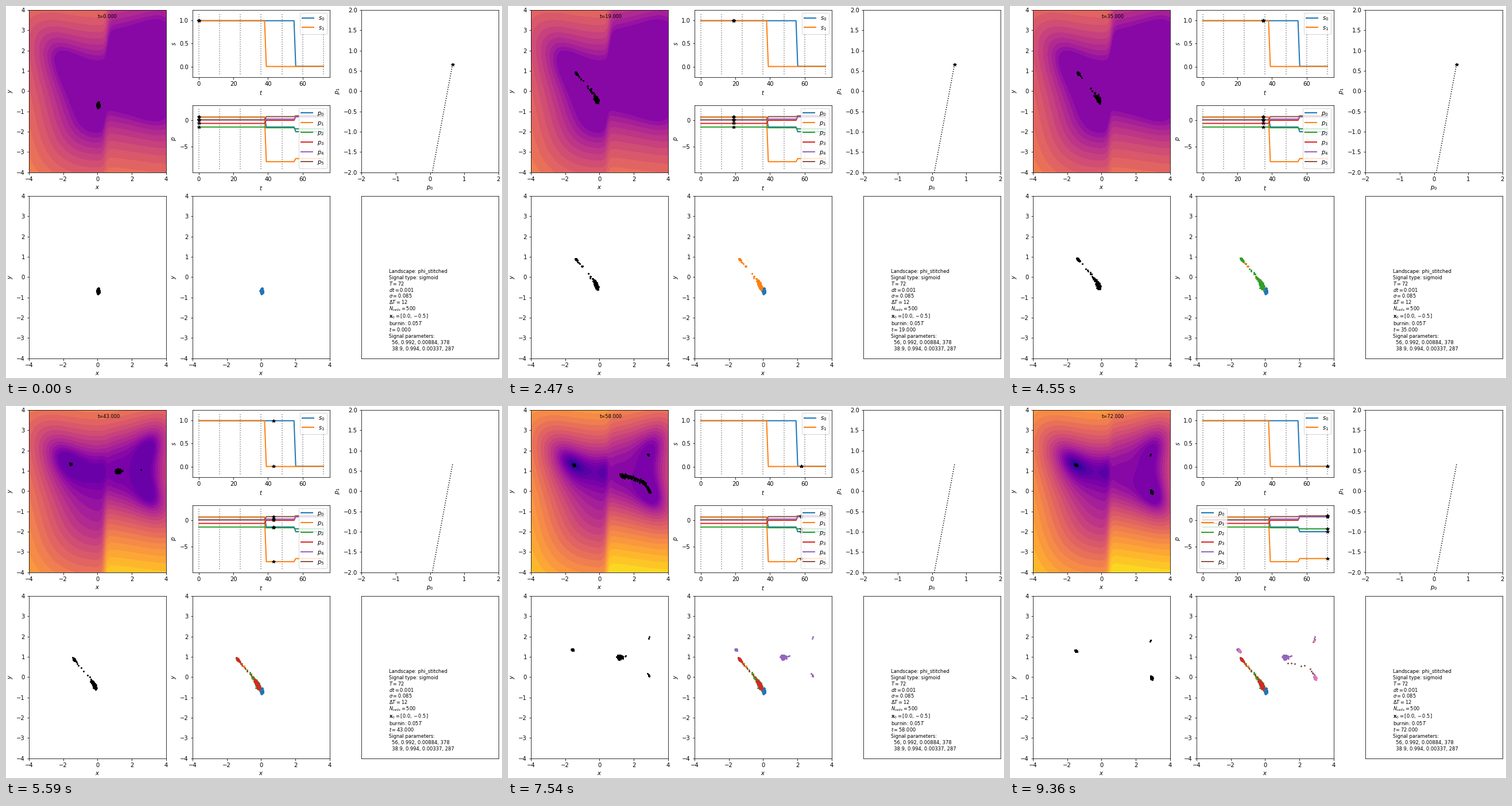
These frames come from a looping animation (864x648 px, 9490 ms). A matplotlib script:

```python
import numpy as np
import matplotlib.pyplot as plt
from matplotlib.animation import FuncAnimation

W, H, DPI = 864, 648, 72
T, STEP = 72, 12
N_CELLS, NOISE, DT = 500, 0.11, 0.01
SWITCH = (38.9, 55.9)

# Signal and parameter values in the three stages between the switches
S = np.array([[0.992, 0.994], [0.992, 0.00337], [0.00884, 0.00337]])
P = np.array([
    [0.66, 0.66, -1.25, -0.55, 0.15, 0.10],
    [-1.24, -7.90, -1.39, 0.05, 0.30, 0.75],
    [-2.15, -7.30, -1.60, 0.70, 0.72, 0.90],
])
# Slight downward pull that keeps the first basin weakly stable
PULL = (0.1, 0, 0)

# Shading: slope, base, floor, right scale, right lift, right floor
SHADE = (
    (0.100, 0.03, 0.28, 0.65, -3.2, 0.0),
    (0.117, 0.00, 0.20, 3.00, 4.9, 0.0),
    (0.125, 0.04, 0.04, 2.00, 4.7, 3.4),
)


def stage(t):
    return sum(t >= s for s in SWITCH)


def seam(x):
    return 1 / (1 + np.exp(-14 * (x - 0.5)))


def choice(x, y, p):
    return x**4 + y**4 + y**3 - 4 * x**2 * y + y**2 + p[0] * x + p[1] * y


def flip(x, y, p):
    u, v = x - 2, y - 1
    return u**4 + v**4 + u**3 - 2 * u * v**2 - u**2 + p[2] * u + p[3] * v


def drift(x, y, p, pull):
    u, v, w = x - 2, y - 1, seam(x)
    x2, y2, u2, v2 = x * x, y * y, u * u, v * v
    gx1 = 4 * x * x2 - 8 * x * y + p[0]
    gy1 = 4 * y * y2 + 3 * y2 - 4 * x2 + 2 * y + p[1] + pull
    gx2 = 4 * u * u2 + 3 * u2 - 2 * v2 - 2 * u + p[2]
    gy2 = 4 * v * v2 - 4 * u * v + p[3]
    return -gx1 - w * (gx2 - gx1), -gy1 - w * (gy2 - gy1)


def simulate():
    rng = np.random.default_rng(7)
    x = rng.normal(0.04, 0.032, N_CELLS)
    y = rng.normal(-0.68, 0.055, N_CELLS)
    path = [(x, y)]
    n = round(1 / DT)
    amp = NOISE * np.sqrt(DT)
    for t in range(T):
        for i in range(n):
            k = stage(t + i * DT)
            fx, fy = drift(x, y, P[k], PULL[k])
            nx, ny = amp * rng.standard_normal((2, N_CELLS))
            x, y = x + fx * DT + nx, y + fy * DT + ny
        path.append((x, y))
    return path


def shade(x, y, k):
    slope, base, floor, scale, lift, low = SHADE[k]
    left = choice(x, y, P[k])
    # Depth is measured from the well on the left of the seam
    left = left - left[x < 0].min()
    right = np.maximum(scale * flip(x, y, P[k]) + lift, low)
    w = seam(x)
    val = np.maximum((1 - w) * left + w * right, 0)
    return np.clip(base + slope * np.log1p(val), floor, 1)


cells = simulate()
times = np.arange(T + 1)
stages = np.array([stage(t) for t in times])
s_t, p_t = S[stages], P[stages]

fig = plt.figure(figsize=(W / DPI, H / DPI), dpi=DPI, facecolor="white")


def panel(x0, top, x1, bottom):
    return fig.add_axes([x0 / W, 1 - bottom / H, (x1 - x0) / W, (bottom - top) / H])


def plane(ax):
    ax.set(xlim=(-4, 4), ylim=(-4, 4), xticks=range(-4, 5, 2), yticks=range(-4, 5))
    ax.set_xlabel("$x$")
    ax.set_ylabel("$y$")


def dots(ax, color):
    return ax.plot([], [], ".", color=color, ms=4)[0]


def series(ax, data, name, span, ylim, yticks):
    for i, col in enumerate(data.T):
        ax.plot(times, col, lw=2, label=f"${name}_{i}$")
    ax.vlines(range(0, T + 1, STEP), *span, colors="grey", linestyles=":")
    ax.set(xlim=(-3.6, 75.6), ylim=ylim, xticks=range(0, 61, 20), yticks=yticks)
    ax.set_xlabel("$t$")
    ax.set_ylabel(f"${name}$")
    ax.legend(loc="upper right")
    return ax.plot([], [], "k*", zorder=3)[0]


COLS = ((40, 278.9), (325, 563.8), (619.3, 857.7))
UP, DOWN = (7, 289.7), (331, 613.7)


def at(col, rows):
    return panel(COLS[col][0], rows[0], COLS[col][1], rows[1])


# Landscape
ax_land = at(0, UP)
gx, gy = np.meshgrid(np.linspace(-4, 4, 200), np.linspace(-4, 4, 200))
levels = 0.02 + 0.04 * np.arange(26)
lands = [ax_land.contourf(gx, gy, shade(gx, gy, k), levels=levels,
                          cmap="plasma", vmin=0, vmax=1) for k in range(3)]
live = dots(ax_land, "k")
clock = ax_land.text(0.5, 0.95, "", transform=ax_land.transAxes, fontsize="small")
plane(ax_land)

# Signals and parameters over time
s_star = series(at(1, (7, 123.9)), s_t, "s", (-0.16, 1.158), (-0.226, 1.223),
                (0, 0.5, 1))
ax_p = at(1, (172.8, 289.7))
p_star = series(ax_p, p_t, "p", (-9.36, 2.36), (-9.94, 2.94), (-5, 0))

# Parameter plane
ax_pp = at(2, UP)
ax_pp.plot(p_t[:, 0], p_t[:, 1], "k:")
pp_star = ax_pp.plot([], [], "k*")[0]
ax_pp.set(xlim=(-2, 2), ylim=(-2, 2), xticks=range(-2, 3),
          yticks=np.arange(-2, 2.1, 0.5))
ax_pp.set_xlabel("$p_0$")
ax_pp.set_ylabel("$p_1$")

# Sampled cells: latest only, and all so far
ax_last, ax_all = at(0, DOWN), at(1, DOWN)
plane(ax_last)
plane(ax_all)
last = dots(ax_last, "k")
samples = [dots(ax_all, f"C{k}") for k in range(T // STEP + 1)]
for k, line in enumerate(samples):
    line.set_data(*cells[k * STEP])

# Run summary, set from the last line upwards
ax_info = at(2, DOWN)
ax_info.set(xticks=[], yticks=[])
SUMMARY = (
    "Landscape: phi_stitched",
    "Signal type: sigmoid",
    "$T=72$",
    "$dt=0.001$",
    r"$\sigma=0.085$",
    r"$\Delta T=12$",
    "$N_{cells}=500$",
    r"$\mathbf{x}_{0}=[0.0, -0.5]$",
    "burnin: $0.05T$",
    "$t=0.000$",
    "Signal parameters:",
    "  56, 0.992, 0.00884, 378",
    "  38.9, 0.994, 0.00337, 287",
)
LEADING, SUBSCRIPT = 10.9, 2.2
base = 600
for row in reversed(SUMMARY):
    # Lines with a subscript need a little more room below
    base -= SUBSCRIPT * ("_{" in row)
    label = fig.text(667.1 / W, 1 - base / H, row, fontsize="small")
    if row.startswith("$t="):
        t_label = label
    base -= LEADING


def update(t):
    for k, land in enumerate(lands):
        land.set_visible(k == stages[t])
    live.set_data(*cells[t])
    clock.set_text(f"t={t:.3f}")
    s_star.set_data([t] * 2, s_t[t])
    p_star.set_data([t] * 6, p_t[t])
    pp_star.set_data([p_t[t, 0]], [p_t[t, 1]])
    # The legend makes way once the markers reach it
    ax_p.legend(loc="upper right" if t < 59 else "upper left")
    last.set_data(*cells[t // STEP * STEP])
    for k, line in enumerate(samples):
        line.set_visible(k * STEP <= t)
    t_label.set_text(f"$t={t:.3f}$")
    return []


anim = FuncAnimation(fig, update, frames=T + 1, interval=130, init_func=lambda: [],
                     repeat=True, repeat_delay=0, blit=False)
plt.show()
```
